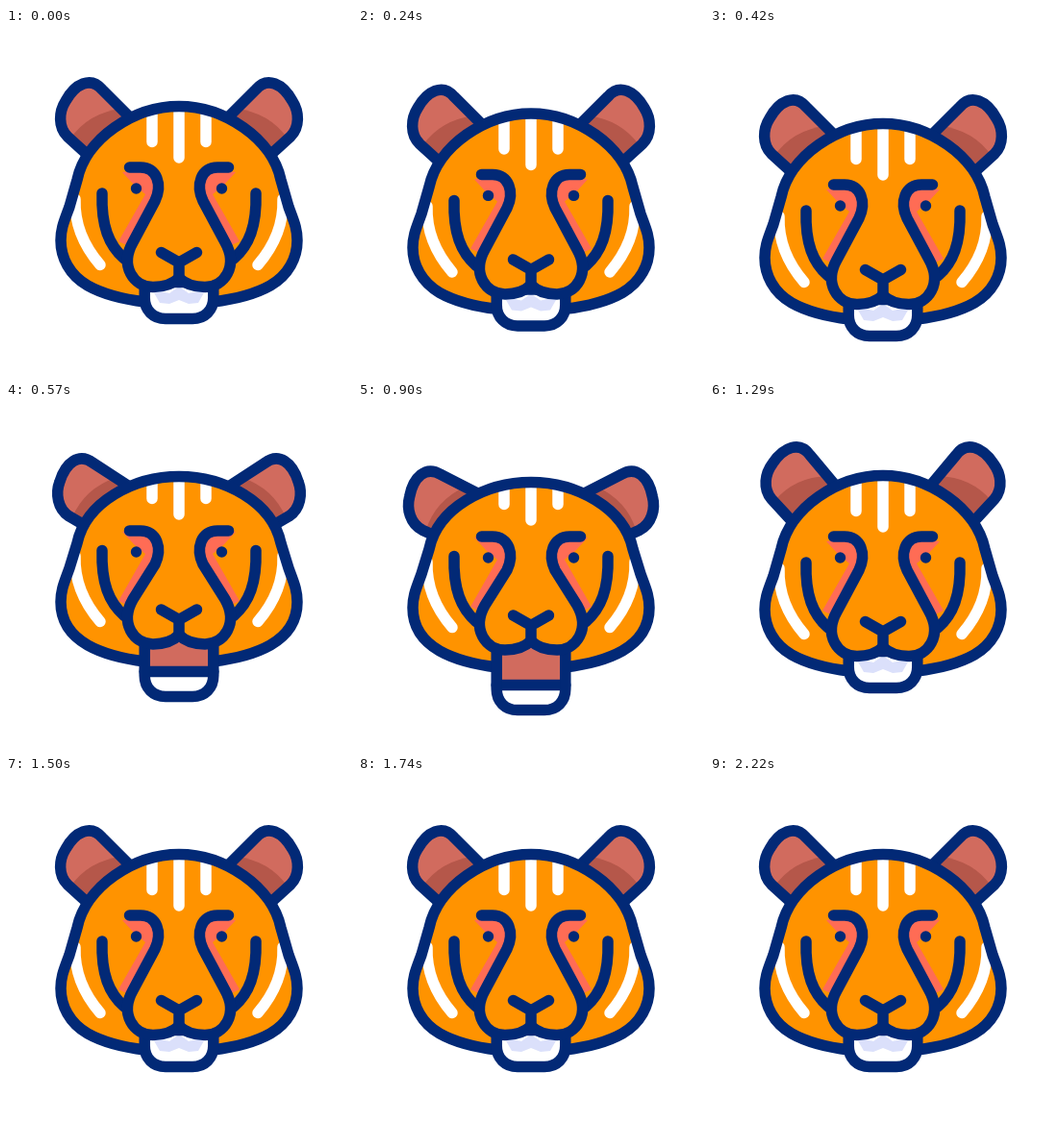
An HTML page for the animation above (2.25 s loop, 360 by 360 pixels).

```html
<!DOCTYPE html>
<html lang="en">
<head>
<meta charset="utf-8">
<title>Roaring tiger</title>
<style>
  html, body { margin: 0; width: 100%; height: 100%; overflow: hidden; background: #fff; }
  svg { display: block; width: 100vw; height: 100vh; }
  .line { fill: none; stroke: #022976; stroke-width: 11.5; stroke-linecap: round; stroke-linejoin: round; }
  .stripe { fill: none; stroke: #fff; stroke-width: 11.5; stroke-linecap: round; }
  .fur { fill: #ff9300; }
  .pink { fill: #d16b5e; }
  .shade { fill: #b5574a; }
  .glow { fill: #ff6c55; }
  .ink { fill: #022976; }
</style>
</head>
<body>
<svg viewBox="0 0 360 360">
  <defs>
    <path id="skull"/>
    <clipPath id="inHead"><use href="#skull"/></clipPath>
  </defs>
  <g id="head">
    <g id="ear">
      <g id="flap">
        <path class="pink" d="M86 133 L64 113 C54 103 55 87 62 76 C72 58 88 50 100 64 L131 95 L100 132Z"/>
        <path class="shade" d="M67 115 Q86 88 120 84 L133 98 L96 134Z"/>
        <path class="line" d="M86 133 L64 113 C54 103 55 87 62 76 C72 58 88 50 100 64 L131 95"/>
      </g>
    </g>
    <use href="#ear" transform="matrix(-1 0 0 1 360 0)"/>
    <use href="#skull" class="fur"/>
    <g clip-path="url(#inHead)">
      <g id="stripes">
        <path class="stripe" d="M152 70 V118.500 M180 70 V135 M208 70 V118.500"/>
        <path id="side" class="stripe" d="M72 178 C71 206 82 228 98 246.500"/>
        <use href="#side" transform="matrix(-1 0 0 1 360 0)"/>
      </g>
    </g>
    <g id="glow">
      <path id="glowHalf" class="glow" d="M121 150 L150 146 L159 165 L156 180 L130 228 L117 222 L145 173 L133 163Z"/>
      <use href="#glowHalf" transform="matrix(-1 0 0 1 360 0)"/>
    </g>
    <use href="#skull" class="line"/>
    <g id="cheeks">
      <path id="cheek" class="line" d="M100 172 C99 206 107 226 123 240"/>
      <use href="#cheek" transform="matrix(-1 0 0 1 360 0)"/>
    </g>
    <circle class="ink" cx="135.500" cy="167" r="5.700"/>
    <circle class="ink" cx="224.500" cy="167" r="5.700"/>
    <path id="mouth" class="pink"/>
    <path id="chin" fill="#fff"/>
    <path id="teeth" fill="#dbe0fb" d="M152 272 L160 286 L170 287 L180 283 L190 287 L200 286 L208 272 L190 276 L180 269 L170 276Z"/>
    <path id="lip" class="line"/>
    <path id="jaw" class="line"/>
    <path id="muzzle" class="fur"/>
    <path id="muzzleLine" class="line"/>
    <path id="nose" class="line" d="M161.500 233.500 L180 244 L198.500 233.500 M180 244 V260"/>
  </g>
</svg>
<script>
const LOOP = 2250;
// time, head drop, face lift, jaw drop, ear angle
const KEYS = [
  [0, 0, 0, 0, 0],
  [100, 0, 0, 0, 0],
  [420, 18, 0, 0, 0],
  [570, -11, 1, 15, 12],
  [620, -13, 1, 18, 13],
  [900, -5, 1, 23, 18],
  [1020, 10, .6, 23, 11],
  [1080, 14, .3, 14, 4],
  [1290, -5, 0, 0, -5],
  [1500, 0, 0, 0, 0],
  [LOOP, 0, 0, 0, 0]
];

const $ = id => document.getElementById(id);
const set = (id, name, value) => $(id).setAttribute(name, value);
const shift = (id, y) => set(id, 'transform', `translate(0 ${y})`);

// Slope at a key, flat at turning points so curves never overshoot
function slope(i, k) {
  if (i === 0 || i === KEYS.length - 1) return 0;
  const [p, q, r] = [KEYS[i - 1], KEYS[i], KEYS[i + 1]];
  const a = (q[k] - p[k]) / (q[0] - p[0]);
  const b = (r[k] - q[k]) / (r[0] - q[0]);
  return a * b <= 0 ? 0 : 2 * a * b / (a + b);
}

function sample(t, k) {
  let i = 0;
  while (i < KEYS.length - 2 && t >= KEYS[i + 1][0]) i++;
  const p = KEYS[i], q = KEYS[i + 1], d = q[0] - p[0];
  const u = (t - p[0]) / d, v = 1 - u;
  return v * v * (1 + 2 * u) * p[k] + u * u * (3 - 2 * u) * q[k]
    + d * u * v * (v * slope(i, k) - u * slope(i + 1, k));
}

// The lifted head is foreshortened: crown comes down, chin line goes up
function skullPath(lift) {
  const top = 81.5 + 7 * lift, mid = 221 - 2 * lift, low = -4 * lift;
  return `M145 ${285 + low} C120 ${282 + low} 101 ${277 + low} 85 ${268 + low}
    C66 ${257 + low} 57 ${mid + 18} 57 ${mid} C57 ${mid - 13} 61 ${mid - 21} 66 ${mid - 35} L74 158
    C83 115 133 ${top} 180 ${top} C227 ${top} 277 115 286 158
    L294 ${mid - 35} C299 ${mid - 21} 303 ${mid - 13} 303 ${mid} C303 ${mid + 18} 294 ${257 + low} 275 ${268 + low}
    C259 ${277 + low} 240 ${282 + low} 215 ${285 + low}`;
}

function muzzlePath(y) {
  return `M128.500 145 H140 C157 145 163 163 155 180 L132 ${223 + y}
    C118 ${248 + y} 133 ${269.5 + y} 153 ${269.5 + y} C165 ${269.5 + y} 173 ${267 + y} 180 ${260 + y}
    C187 ${267 + y} 195 ${269.5 + y} 207 ${269.5 + y} C227 ${269.5 + y} 242 ${248 + y} 228 ${223 + y}
    L205 180 C197 163 203 145 220 145 H231.500`;
}

function draw(t) {
  const [drop, lift, open, angle] = [1, 2, 3, 4].map(k => sample(t, k));
  const y = -6.5 * lift;
  shift('head', drop);
  set('flap', 'transform', `translate(0 ${angle * .7}) rotate(${-angle} 105 110)`);
  shift('stripes', -7 * lift);
  shift('glow', -4 * lift);
  shift('cheeks', y);
  shift('nose', y);
  set('skull', 'd', skullPath(lift));

  const top = 264 + y, base = 302.5 + open;
  const lip = base - 26 - 12 * Math.max(0, 1 - open / 12);
  const bowl = from => `M144.200 ${from} V${base - 22} C144.200 ${base - 9} 153 ${base} 166 ${base}
    H194 C207 ${base} 215.800 ${base - 9} 215.800 ${base - 22} V${from}`;
  set('mouth', 'd', `M144.200 ${top} H215.800 V${lip} H144.200Z`);
  set('chin', 'd', bowl(lip) + 'Z');
  set('jaw', 'd', bowl(top));
  set('lip', 'd', `M144.200 ${lip} H215.800`);
  set('teeth', 'opacity', Math.max(0, 1 - open / 4));

  const face = muzzlePath(y);
  set('muzzle', 'd', face);
  set('muzzleLine', 'd', face);
}

const start = performance.now();
function tick() {
  draw((performance.now() - start) % LOOP);
  requestAnimationFrame(tick);
}
tick();
</script>
</body>
</html>
```
